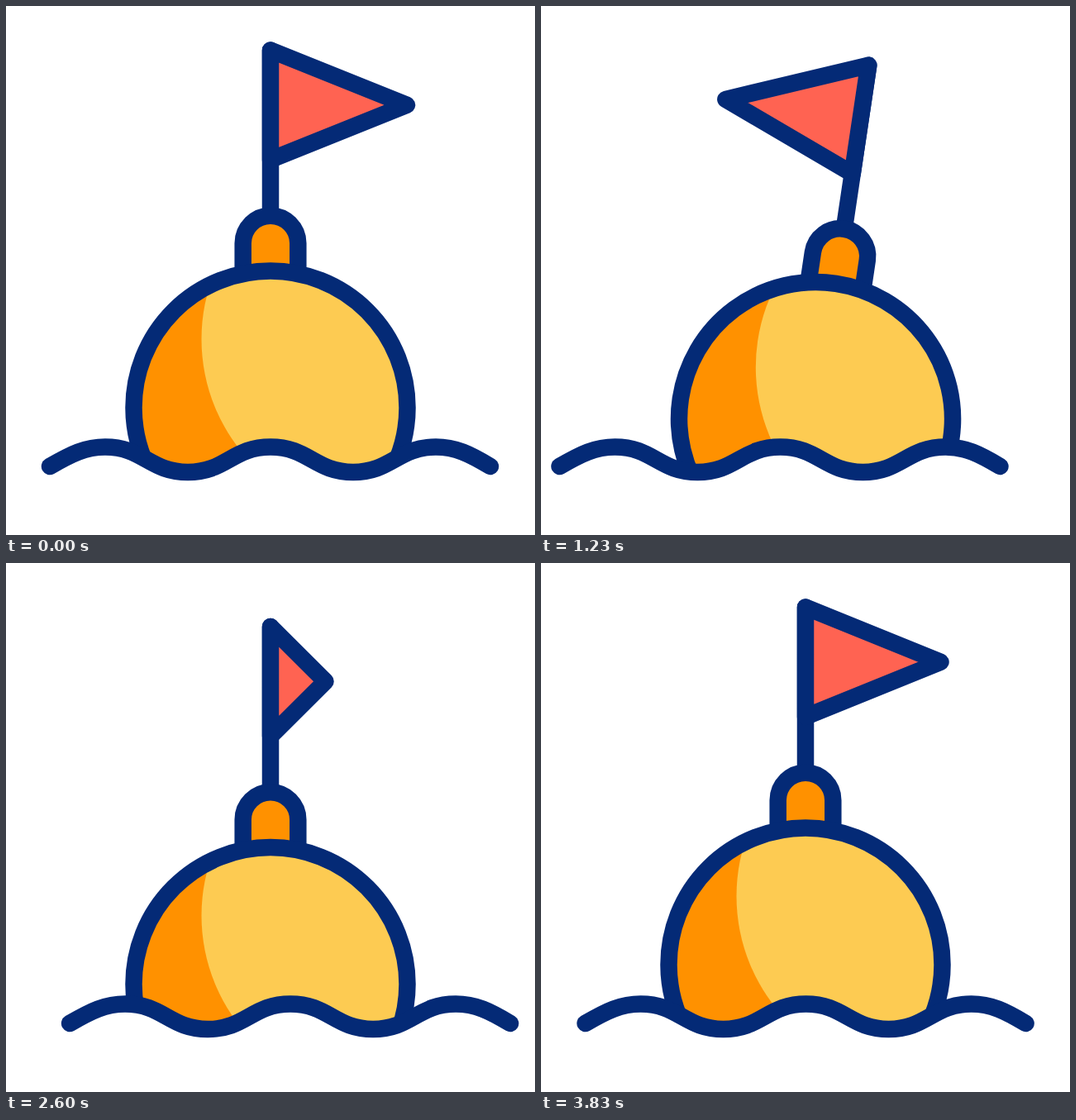
An HTML page for the animation above (3870 ms loop, 640 by 640 pixels).

```html
<!DOCTYPE html>
<html lang="en">
<head>
<meta charset="utf-8">
<title>Buoy</title>
<style>
  html, body { margin: 0; width: 100%; height: 100%; overflow: hidden; background: #fff; }
  svg { display: block; width: 100%; height: 100%; }
  .line { stroke: #042a76; stroke-width: 20.5; stroke-linecap: round; stroke-linejoin: round; }
</style>
</head>
<body>
<svg viewBox="0 0 640 640">
  <defs>
    <clipPath id="above"><path id="air"/></clipPath>
    <clipPath id="ball"><circle cx="320" cy="486" r="165.5"/></clipPath>
  </defs>
  <g clip-path="url(#above)">
    <g id="buoy">
      <path class="line" d="M320 53.5V255"/>
      <path id="flag" class="line" fill="#ff6352"/>
      <path class="line" fill="#ff9100" d="M286.7 318V287a33.3 33.3 0 0 1 66.6 0V318"/>
      <circle cx="320" cy="486" r="165.5" fill="#ff9100"/>
      <circle cx="452.5" cy="403" r="216" fill="#fdcb52" clip-path="url(#ball)"/>
      <circle class="line" cx="320" cy="486" r="165.5" fill="none"/>
    </g>
  </g>
  <path id="wave" class="line" fill="none"/>
</svg>
<script>
const LOOP = 3870, FRAMES = 116;
const $ = id => document.getElementById(id);

// Keys are [frame, value] pairs, eased in and out between neighbours.
const drift = [[0, 0], [12, -31.7], [25, 25], [38, -31.7], [51, 25], [64, -31.7],
               [77, 25], [90, -31.7], [103, 25], [116, 0]];
const tilt = [[0, 0], [12, 10], [25, -11.9], [38, 8.9], [51, -9.6], [64, 4.1], [77, 0]];
const sink = [[0, 0], [14, 24], [31, 0], [44.5, 31], [57.7, 0], [72, 30], [92, 0]];
const flap = [[0, 1], [11, 1], [37, -1], [55, -1], [91, 1], [103, 0.6], [116, 1]];

function at(keys, f) {
  const i = keys.findIndex(k => k[0] > f);
  if (i < 0) return keys[keys.length - 1][1];
  const [f0, a] = keys[i - 1], [f1, b] = keys[i];
  const u = (f - f0) / (f1 - f0);
  return a + (b - a) * u * u * (3 - 2 * u);
}

const swell = "c26 -15 43 -23.5 67 -23.5" +
  "c46 0 54 30.5 100 30.5c46 0 54 -30.5 100 -30.5".repeat(2) +
  "c24 0 41 8.5 66 23.5";
$("wave").setAttribute("d", "M53 557" + swell);
$("air").setAttribute("d", "M53 557" + swell + "H900V-200H-260V557Z");

function draw(now) {
  const f = now % LOOP / LOOP * FRAMES;
  const shift = `translate(${at(drift, f)} 0)`;
  $("wave").setAttribute("transform", shift);
  $("air").setAttribute("transform", shift);
  $("buoy").setAttribute("transform", `translate(0 ${at(sink, f)}) rotate(${at(tilt, f)} 320 571)`);
  $("flag").setAttribute("d", `M320 53.5L${320 + 165 * at(flap, f)} 119.7L320 186Z`);
}

const start = performance.now();
function tick() {
  draw(performance.now() - start);
  requestAnimationFrame(tick);
}
tick();
</script>
</body>
</html>
```
